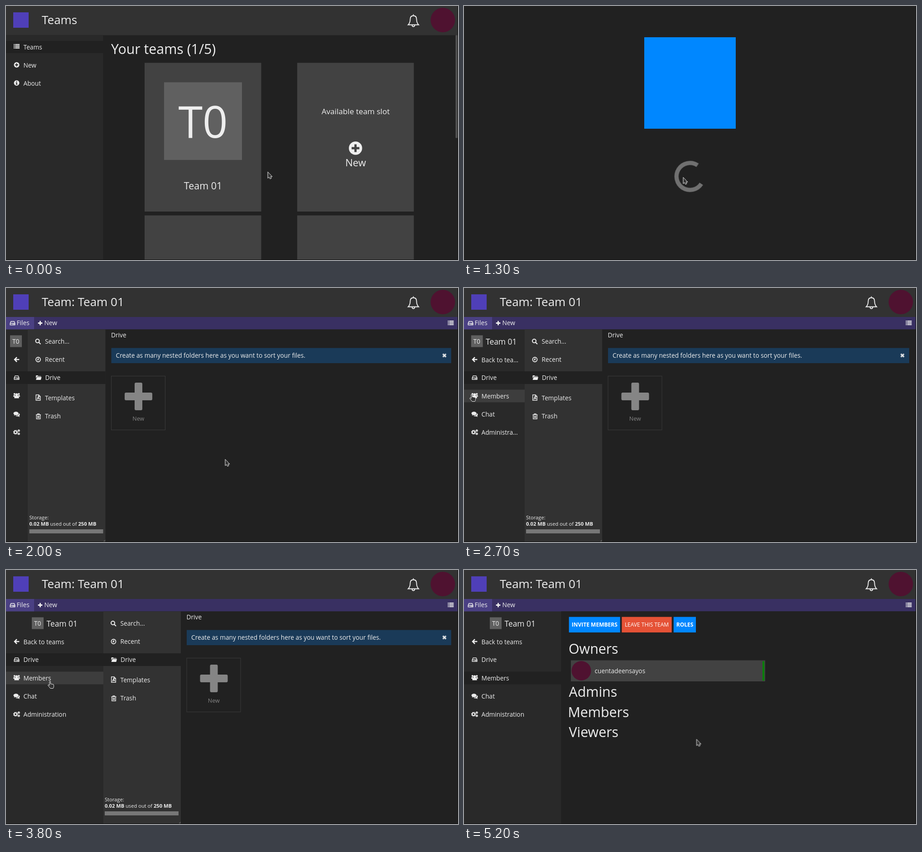
Write an HTML page that moves like this. It is 998 by 561 pixels and loops after 6000 ms.

```html
<!DOCTYPE html>
<html lang="en">
<head>
<meta charset="utf-8">
<title>Teams</title>
<style>
html, body { margin: 0; width: 100%; height: 100%; overflow: hidden; background: #212121; }
svg { display: block; width: 998px; height: 561px; font: 13.73px "Open Sans", sans-serif; fill: #eee; }
.title { font-size: 26px; }
.h1 { font-size: 30.3px; }
.mid { text-anchor: middle; }
.b { font-weight: 700; }
.line { fill: none; stroke: #eee; stroke-width: 1.4; }
.header { fill: #323232; }
.base, .row { fill: #212121; }
.side { fill: #292929; }
.card { fill: #424242; }
.tile { fill: #606060; }
.brand { fill: #4f3fb8; }
.avatar { fill: #4f1230; }
.blue { fill: #0087ff; }

/* One 6 s loop shared by every moving part */
.teams, .hover, .loading, .storage, .push, .who, .labels, .cut, .full,
.row-drive, .row-members, .members, .cursor, .arrow, .hand {
  animation: 6s step-end infinite;
}
.teams { animation-name: teams; }
.hover { animation-name: hover; }
.loading { animation-name: loading; }
.spin { animation: spin 1s steps(10) infinite; }
.storage { animation-name: storage; }
.push { animation-name: push; }
.who { animation-name: who; }
.labels { animation-name: labels; }
.cut { animation-name: cut; }
.full { animation-name: full; }
.row-drive { animation-name: row-drive; }
.row-members { animation-name: row-members; }
.members { animation-name: members; }
.cursor { animation-name: cursor; }
.arrow { animation-name: arrow; }
.hand { animation-name: hand; }

@keyframes teams { 0% { opacity: 1 } 21.66%, to { opacity: 0 } }
@keyframes hover { 0% { fill: #424242 } 20%, to { fill: #4f4f4f } }
@keyframes loading {
  0% { opacity: 0 } 21.66% { opacity: 1 } 23.33% { opacity: .84 } 25% { opacity: .54 }
  26.66% { opacity: .31 } 28.33% { opacity: .16 } 30% { opacity: .07 }
  31.66% { opacity: .02 } 33.33%, to { opacity: 0 }
}
@keyframes spin { to { transform: rotate(360deg) } }
@keyframes storage { 0% { opacity: 0 } 31.66%, to { opacity: 1 } }
@keyframes push {
  0% { transform: translateX(48px) } 45% { transform: translateX(133.5px) }
  46.66% { transform: translateX(194px) } 48.33% { transform: translateX(213px) }
  50%, to { transform: translateX(214.5px) }
}
@keyframes who {
  0% { transform: translateX(9px) } 45% { transform: translateX(15.5px) }
  46.66% { transform: translateX(46.5px) } 48.33% { transform: translateX(56px) }
  50%, to { transform: translateX(57px) }
}
@keyframes labels { 0% { opacity: 0 } 45%, to { opacity: 1 } }
@keyframes cut { 0% { opacity: 1 } 46.66%, to { opacity: 0 } }
@keyframes full { 0% { opacity: 0 } 46.66%, to { opacity: 1 } }
@keyframes row-drive { 0% { opacity: 1 } 75%, to { opacity: 0 } }
@keyframes row-members { 0% { fill: #292929 } 45% { fill: #3d3d3d } 75%, to { fill: #212121 } }
@keyframes members { 0% { opacity: 0 } 75%, to { opacity: 1 } }
@keyframes arrow { 0% { opacity: 1 } 45% { opacity: 0 } 80%, to { opacity: 1 } }
@keyframes hand { 0% { opacity: 0 } 45% { opacity: 1 } 80%, to { opacity: 0 } }
@keyframes cursor {
  0% { transform: translate(577px, 366px) }
  8.33% { transform: translate(577px, 366px); animation-timing-function: steps(4, start) }
  15% { transform: translate(483px, 378px) }
  36.66% { transform: translate(483px, 378px); animation-timing-function: steps(3, start) }
  41.66% { transform: translate(242px, 385px) }
  45% { transform: translate(12px, 234px) }
  46.66% { transform: translate(12px, 234px); animation-timing-function: steps(6, start) }
  56.66% { transform: translate(41px, 242px); animation-timing-function: steps(5, start) }
  65% { transform: translate(92px, 245px) }
  80% { transform: translate(143px, 259px) }
  83.33% { transform: translate(497px, 370px) }
  86.66%, to { transform: translate(512.5px, 373.5px) }
}
</style>
</head>
<body>
<svg viewBox="0 0 998 561">
  <defs>
    <!-- Icons, centred on 0,0 -->
    <path id="list" class="line" style="stroke-width:1.8" d="M-6.5-4.2h2m1 0h10M-6.5-1.4h2m1 0h10M-6.5 1.4h2m1 0h10M-6.5 4.2h2m1 0h10"/>
    <path id="add" fill-rule="evenodd" d="M-6 0a6 6 0 1 0 12 0a6 6 0 1 0-12 0M-1-3.5h2V-1h2.5v2H1v2.5h-2V1h-2.5v-2H-1z"/>
    <path id="info" fill-rule="evenodd" d="M-6 0a6 6 0 1 0 12 0a6 6 0 1 0-12 0M-1-4.2h2v1.8h-2zM-1.9-1.3H1v3.8h.9v1.3h-3.8V2.5h.9V0h-.9z"/>
    <path id="plus" class="line" style="stroke-width:2.8" d="M-4.8 0h9.6M0-4.8v9.6"/>
    <g id="drive"><path class="line" d="M-5.3.5l1.8-4.3h7l1.8 4.3v3.5H-5.3zh10.6"/><path d="M.5 1.6h1.4V3H.5zm2.3 0h1.4V3H2.8z"/></g>
    <path id="back" class="line" style="stroke-width:2.5" d="M5.8 0h-10M.5-5l-5 5 5 5"/>
    <g id="users">
      <circle cx="-4.8" cy="-3.5" r="2"/><circle cx="4.8" cy="-3.5" r="2"/><circle cy="-2" r="3"/>
      <path d="M-7.5 2.5q0-4 2.5-3.5h2L-4.5 2.5zM7.5 2.5q0-4-2.5-3.5h-2l1.5 3.5zM-5 6q-1-5 2.5-5.5h5Q6 1 5 6z"/>
    </g>
    <path id="chat" d="M-7-1.500c0-5 11-5 11 0s-5.500 4-7 3.500l-3 1.500 1-2.300q-2-1.200-2-2.700M5-2q2 1 2 3T5.500 4L7 6.500 3.500 5Q-1 5.500-2.500 3.500 5 4 5-2"/>
    <g id="cogs" class="line">
      <circle cx="-2.5" r="3" style="stroke-width:2.2"/><circle cx="-2.5" r="4.5" stroke-dasharray="1.77"/>
      <g style="stroke-width:1.8"><circle cx="4.7" cy="-3.5" r="1.7"/><circle cx="4.7" cy="3.5" r="1.7"/></g>
    </g>
    <path id="search" class="line" style="stroke-width:2" d="M2.5-1a4 4 0 1 1-8 0a4 4 0 1 1 8 0M1.5 2l4 4"/>
    <path id="clock" class="line" style="stroke-width:1.8" d="M-5 0a5 5 0 1 1 10 0a5 5 0 1 1-10 0M.3-3v3.5h-2.5"/>
    <path id="folder" d="M-6-4q0-1 1-1h3q1 0 1 1.5h5.5q1 0 1 1H-4L-6 2zM-3.5-1.6h10L5 4.5q-.3.5-1 .5h-10z"/>
    <path id="file" class="line" d="M-4.8-6h6l3.6 3.6V6h-9.6zM1-6v3.8h3.8M-2.5 4L0-2l2.5 4.5-4-.8"/>
    <path id="trash" class="line" style="stroke-width:1.3" d="M-5.5-3.5h11M-2-3.5V-5.5h4v2M-4.3-3.5V5.5h8.6v-9M-1.8-1v4.5M0-1v4.5M1.8-1v4.5"/>
  </defs>

  <!-- Team workspace -->
  <rect class="header" width="998" height="65"/>
  <text class="title" x="79" y="40">Team: Team 01</text>
  <rect y="64" width="998" height="28" fill="#393062"/>
  <rect y="64" width="62" height="28" fill="#4a4083"/>
  <use href="#drive" x="14.5" y="77.5"/><text x="23.5" y="82">Files</text>
  <use href="#plus" x="75.5" y="77.5"/><text x="84.5" y="82">New</text>
  <use href="#list" x="982" y="77"/>

  <rect class="side" y="91.5" width="998" height="470"/>
  <rect class="row row-drive" y="184" width="230" height="28"/>
  <rect class="row-members" y="224.5" width="230" height="28"/>
  <g class="who">
    <rect class="tile" y="104.5" width="26" height="26"/>
    <text class="mid" x="12.7" y="123">T0</text>
    <text class="labels" x="32.5" y="124.5" font-size="17.4">Team 01</text>
  </g>
  <use href="#back" x="23.5" y="158"/>
  <use href="#drive" x="23.5" y="198"/>
  <use href="#users" x="23.5" y="237.5"/>
  <use href="#chat" x="23.5" y="278.5"/>
  <use href="#cogs" x="23.5" y="318.5"/>
  <g class="labels">
    <g class="cut"><text x="38.5" y="163.5">Back to tea…</text><text x="38.5" y="324">Administra…</text></g>
    <g class="full"><text x="38.5" y="163.5">Back to teams</text><text x="38.5" y="324">Administration</text></g>
    <text x="38.5" y="203">Drive</text>
    <text x="38.5" y="243.5">Members</text>
    <text x="38.5" y="284">Chat</text>
  </g>

  <g class="push">
    <rect class="base" y="91.5" width="998" height="470"/>
    <rect class="header" y="91.5" width="171.5" height="470"/>
    <rect class="row" y="184" width="171.5" height="28"/>
    <use href="#search" x="23" y="118"/><text x="38" y="123">Search...</text>
    <use href="#clock" x="23" y="158"/><text x="38" y="162.5">Recent</text>
    <use href="#folder" x="24" y="198"/><text x="38.5" y="203">Drive</text>
    <use href="#file" x="23" y="242"/><text x="38" y="247.5">Templates</text>
    <use href="#trash" x="23.5" y="283.5"/><text x="38" y="288">Trash</text>
    <g class="storage" font-size="11.15">
      <text x="3.5" y="510.5">Storage:</text>
      <text x="3.5" y="525"><tspan class="b">0.02 MB</tspan> used out of <tspan class="b">250 MB</tspan></text>
      <rect x="3.5" y="533" width="163" height="9" fill="#777"/>
    </g>
    <path d="M167 560.5l4-4m-2 4l2-2" stroke="#777"/>
    <text x="184" y="109">Drive</text>
    <rect x="184.5" y="132.5" width="998" height="33.5" fill="#1a3a58"/>
    <text x="194.5" y="154">Create as many nested folders here as you want to sort your files.</text>
    <rect x="184.5" y="194.5" width="119" height="119" fill="none" stroke="#3a3a3a"/>
    <g fill="#858585">
      <rect x="214" y="231" width="61" height="17" rx="3"/><rect x="236" y="209" width="17" height="61" rx="3"/>
      <text class="mid" x="244.3" y="293" font-size="12.5">New</text>
    </g>
  </g>
  <rect class="base" x="983" y="92" width="15" height="469"/>
  <use href="#plus" transform="translate(968 149) rotate(45)"/>

  <g class="members">
    <rect class="base" x="214.5" y="91.5" width="784" height="470"/>
    <rect class="blue" x="231.7" y="103.6" width="113" height="34.3"/>
    <rect x="348.4" y="103.6" width="110.2" height="34.3" fill="#e55236"/>
    <rect class="blue" x="462.8" y="103.6" width="49.2" height="34.3"/>
    <g class="mid" font-size="12" fill="#fff">
      <text class="b" x="288.3" y="125.3">INVITE MEMBERS</text>
      <text x="403.5" y="125.3">LEAVE THIS TEAM</text>
      <text class="b" x="487.5" y="125.3">ROLES</text>
    </g>
    <g class="h1">
      <text x="231" y="185">Owners</text><text x="231.5" y="280">Admins</text>
      <text x="229.5" y="324.5">Members</text><text x="231.5" y="368.5">Viewers</text>
    </g>
    <rect class="card" x="236" y="199.5" width="429" height="46.5"/>
    <circle class="avatar" cx="259" cy="222.5" r="21.5"/>
    <text x="288.5" y="228">cuentadeensayos</text>
    <rect x="659" y="201.5" width="4.3" height="43" fill="#0a7d0a"/>
  </g>

  <!-- Team list -->
  <g class="teams">
    <rect class="base" width="998" height="561"/>
    <rect class="header" width="998" height="64.5"/>
    <text class="title" x="79" y="40">Teams</text>
    <rect class="side" y="64.5" width="214.5" height="497"/>
    <rect class="row" y="77" width="214.5" height="27"/>
    <use href="#list" x="23.5" y="89"/><text x="38.5" y="95.5">Teams</text>
    <use href="#add" x="23.5" y="130"/><text x="38.5" y="135.5">New</text>
    <use href="#info" x="23.5" y="170"/><text x="38.5" y="175.5">About</text>
    <text class="h1" x="232" y="106">Your teams (1/5)</text>
    <rect class="card hover" x="306" y="125.5" width="257.5" height="328.5"/>
    <rect class="card" x="643" y="125.5" width="257.5" height="328.5"/>
    <rect class="card" x="306" y="462.5" width="257.5" height="100"/>
    <rect class="card" x="643" y="462.5" width="257.5" height="100"/>
    <rect class="tile" x="349" y="168.5" width="172" height="171.5"/>
    <g class="mid">
      <text x="435" y="291" font-size="97">T0</text>
      <text x="435" y="405" font-size="21.45">Team 01</text>
      <text x="772" y="239" font-size="17.16">Available team slot</text>
      <text x="772" y="353.5" font-size="22">New</text>
    </g>
    <use href="#add" transform="translate(771.7 314) scale(2.45)"/>
    <rect x="992.5" y="64.5" width="4.5" height="227" fill="#505050"/>
  </g>

  <!-- Header items -->
  <rect class="brand" x="16" y="14" width="34" height="34"/>
  <path class="line" style="stroke-width:1.9" d="M888 41.5q4.500-4.500 4.500-12.500 0-7.500 7-7.500t7 7.500q0 8 4.500 12.500zM899.500 21.500v-3M896.500 42.500q.5 3 3 3t3-3"/>
  <circle class="avatar" cx="964.5" cy="31" r="27"/>

  <g class="loading">
    <rect class="base" width="998" height="561"/>
    <rect class="blue" x="398" y="69" width="202" height="202"/>
    <g transform="translate(499 376.5)">
      <g class="spin">
        <circle r="29.8" transform="rotate(-75)" pathLength="360" fill="none" stroke="#707070" stroke-width="9.2" stroke-dasharray="271 89"/>
      </g>
    </g>
  </g>

  <path d="M997.5 0v560.5H0" fill="none" stroke="#111"/>

  <g class="cursor" fill="#333" stroke="#eee">
    <path class="arrow" d="M1 .4v14l3-2.500 2 4 3-1.500-2-3.500h4z"/>
    <path class="hand" d="M4 10V2q0-1.300 1.200-1.300T6.400 2v4.500l5.600 1q1.500.3 1.500 2v3q0 2-1.500 4H6L.8 10q0-2 1.700-1.500z"/>
  </g>
</svg>
</body>
</html>
```
